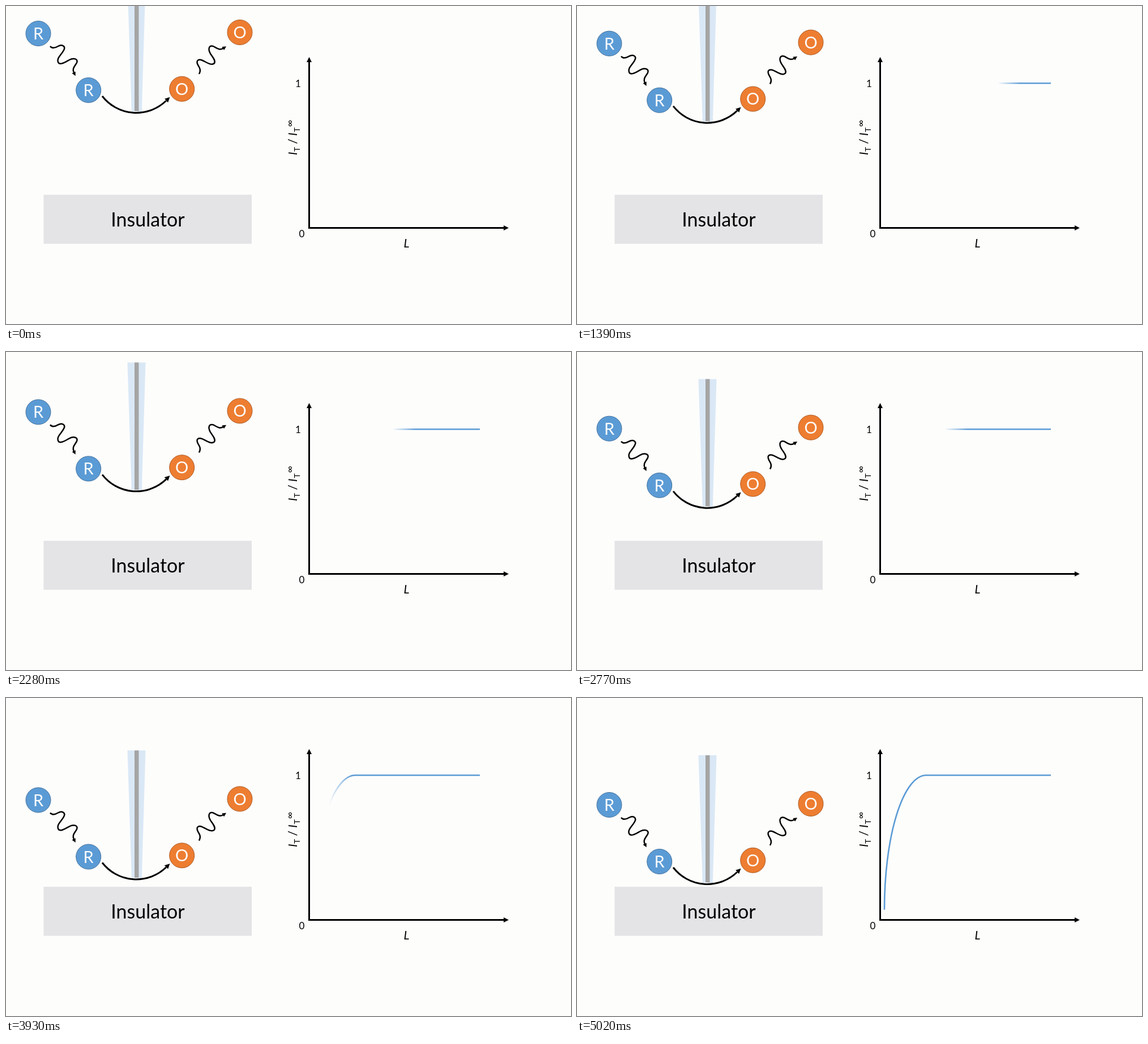
Animation of 998x561 px, one loop 5.06 s. Source, as an HTML page:

```html
<!DOCTYPE html>
<html>
<head>
<meta charset="utf-8">
<style>
  html, body { margin: 0; width: 100%; height: 100%; overflow: hidden; background: #fdfdfc; }
  svg { display: block; }
  text { font-family: Lato, Carlito, sans-serif; text-anchor: middle; }
  .line { fill: none; stroke: #000; stroke-width: 3; }
  .wave { stroke-width: 2.5; }
  .red circle { fill: #5b9bd5; stroke: #41719c; }
  .ox circle { fill: #ed7d31; stroke: #ae5a21; }
  #probe text { fill: #fff; font-size: 29px; }
  .axis { font-size: 17px; }
  .name { font-size: 21px; text-anchor: start; }
</style>
</head>
<body>
<svg width="998" height="561" viewBox="0 0 998 561">
  <defs>
    <marker id="head" markerUnits="userSpaceOnUse" markerWidth="10" markerHeight="10" refX="0" refY="5" orient="auto">
      <path d="M0 .5L9 5L0 9.5Z"/>
    </marker>
    <marker id="tip" markerUnits="userSpaceOnUse" markerWidth="8" markerHeight="8" refX="1" refY="4" orient="auto">
      <path d="M0 .5L7 4L0 7.5Z"/>
    </marker>
    <linearGradient id="wipe" gradientUnits="userSpaceOnUse" y1="0" y2="0">
      <stop offset="0" stop-color="#5b9bd5" stop-opacity="0"/>
      <stop offset="1" stop-color="#5b9bd5"/>
    </linearGradient>
  </defs>

  <rect x="66.5" y="333" width="367.5" height="86.5" fill="#e4e3e6"/>
  <text x="250.5" y="389" font-size="34">Insulator</text>

  <path class="line" d="M535.5 393V99" marker-end="url(#head)"/>
  <path class="line" d="M534 391.5H879" marker-end="url(#head)"/>
  <text class="axis" x="516" y="142.5">1</text>
  <text class="axis" x="522.5" y="408">0</text>
  <text class="name" x="702.5" y="426" font-style="italic">L</text>
  <g class="name" transform="translate(513.5 263)rotate(-90)">
    <text class="name" x="0" font-style="italic">I</text>
    <text class="name" x="6" y="5.5" style="font-size:14px">T</text>
    <text class="name" x="19.5">/</text>
    <text class="name" x="34" font-style="italic">I</text>
    <text class="name" x="40.5" y="5.5" style="font-size:14px">T</text>
    <text x="56" y="-7" style="font-size:17px">∞</text>
  </g>

  <path d="M837 136.2H617A74 237 0 0 0 543 373.5" fill="none" stroke="url(#wipe)" stroke-width="2.6"/>

  <g id="probe">
    <path d="M214.5 -39H246.5L239.8 186H221.8Z" fill="#dae8f6"/>
    <path d="M227 -39H234.5V185.5H227Z" fill="#a5a5a5"/>
    <path class="line" d="M170 159A76 76 0 0 0 283 167" marker-end="url(#head)"/>
    <path class="line wave" d="M78 71C82 76 87 74 92 71C99 67 106 71 102 78C98 86 89 92 92 99C95 106 106 98 112 95C119 91 128 93 125 100C122 106 116 110 120 118" marker-end="url(#tip)"/>
    <path class="line wave" d="M341 120C345 113 342 109 339 104C335 96 340 93 347 96C354 99 363 106 368 101C371 96 364 89 361 84C356 75 359 69 366 71C372 74 377 79 384 74.5" marker-end="url(#tip)"/>
    <g class="red" transform="translate(57 48.5)"><circle r="22"/><text y="10.5">R</text></g>
    <g class="red" transform="translate(145.7 148.5)"><circle r="22"/><text y="10.5">R</text></g>
    <g class="ox" transform="translate(310.7 146.3)"><circle r="22"/><text y="10.5">O</text></g>
    <g class="ox" transform="translate(413 46.5)"><circle r="22"/><text y="10.5">O</text></g>
  </g>
</svg>
<script>
  const LOOP = 5060, DROP = 140, SOFT = 40;
  const probe = document.getElementById('probe');
  const wipe = document.getElementById('wipe');
  const clamp = u => Math.min(1, Math.max(0, u));
  const ease = u => u < .5 ? 2 * u * u : 1 - 2 * (1 - u) ** 2;

  function draw(now) {
    const t = now % LOOP;
    const edge = 837 - .0677 * t;
    probe.setAttribute('transform', `translate(0 ${DROP * ease(clamp((t - 280) / 4420))})`);
    wipe.setAttribute('x1', edge);
    wipe.setAttribute('x2', edge + SOFT);
    requestAnimationFrame(draw);
  }
  const start = performance.now();
  (function frame() {
    draw.call(null, 0);
  });
  requestAnimationFrame(function tick() {
    draw(performance.now());
  });
</script>
</body>
</html>
```
